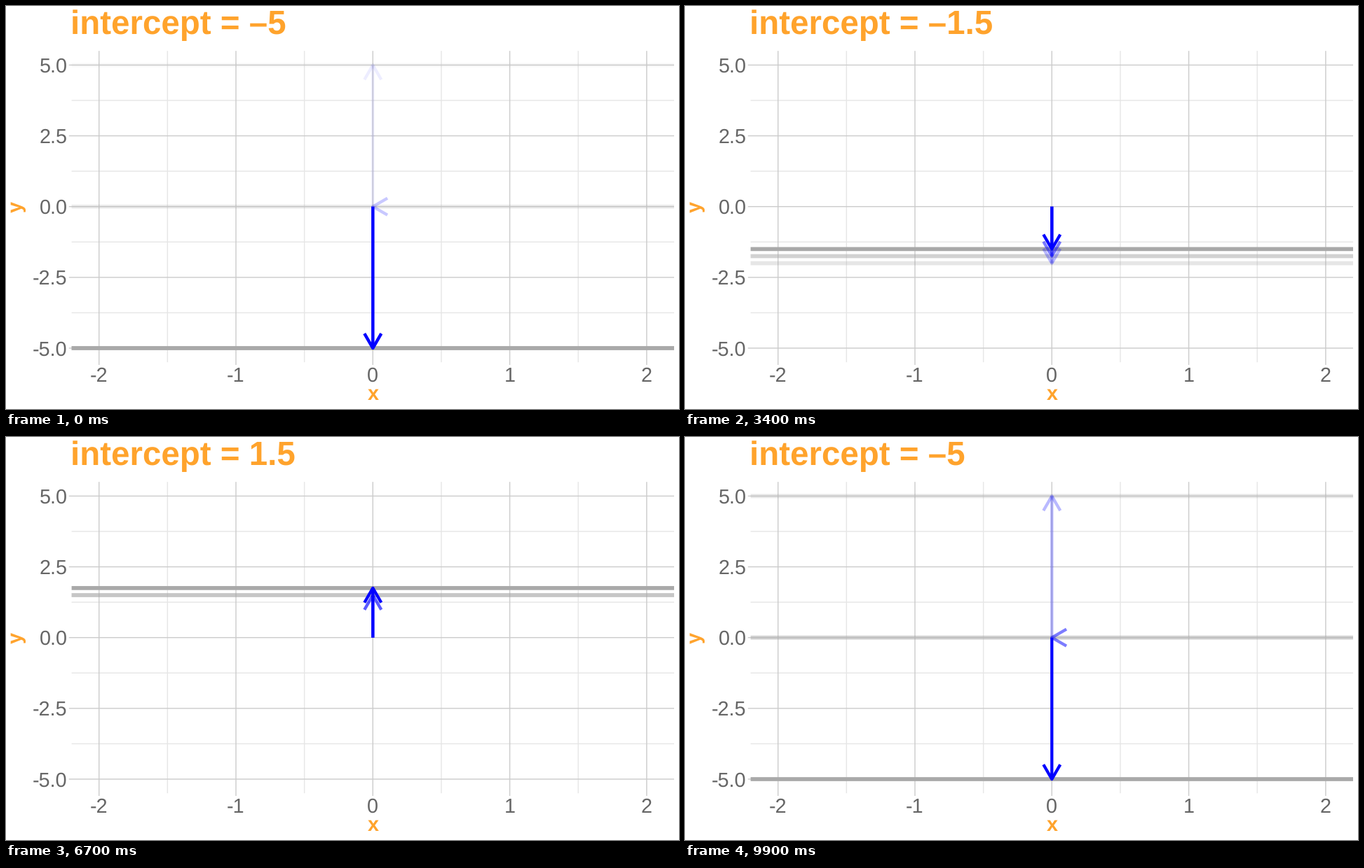
These frames come from a looping animation (960 px wide and 576 px high, 10000 ms). A matplotlib script:

```python
import numpy as np
import matplotlib.pyplot as plt
from matplotlib.animation import FuncAnimation

W, H, DPI = 960, 576, 96
PT = 72 / DPI                      # points per pixel
FRAMES, INTERVAL, WAKE = 100, 100, 5
ORANGE, GREY, BLUE = "#ffa32c", "#a9a9a9", "#0000ff"
LEFT, RIGHT, TOP, BOTTOM = 93.6, 953, 64.2, 509.2
TICK = 3.8

plt.rcParams.update({"path.snap": False, "text.hinting": "none",
                     "font.family": "Liberation Sans"})
fig = plt.figure(figsize=(W / DPI, H / DPI), dpi=DPI, facecolor="white")
ax = fig.add_axes([0, 0, 1, 1])
ax.set(xlim=(0, W), ylim=(H, 0))
ax.axis("off")
ax.autoscale(False)


def px(x):
    return 523.3 + 195.3 * x


def py(y):
    return 286.7 - 40.46 * y


def line(xs, ys, color, width, alpha=1, z=1):
    return ax.plot(xs, ys, color=color, lw=width * PT, alpha=alpha, zorder=z,
                   solid_capstyle="butt", solid_joinstyle="round")[0]


def label(x, y, text, size=28.8, **style):
    return ax.text(x, y, text, size=size * PT, va="baseline", **style)


def grid(xs, ys, color, width, tick=0):
    for x in xs:
        line([px(x)] * 2, [TOP, BOTTOM + tick], color, width)
    for y in ys:
        line([LEFT - tick, RIGHT], [py(y)] * 2, color, width)


def draw_panel():
    xs, ys = np.arange(-2, 3), np.arange(-5, 5.1, 2.5)
    grid(xs[:-1] + 0.5, ys[:-1] + 1.25, "#e6e6e6", 1.4)
    grid(xs, ys, "#cccccc", 1.42, TICK)
    for x in xs:
        label(px(x), 536.7, str(x), color="#666666", ha="center")
    for y in ys:
        label(87.6, py(y) + 10.3, f"{y:.1f}", color="#666666", ha="right")

    name = dict(color=ORANGE, weight="bold", ha="center")
    label(px(0), 563, "x", **name)
    label(23, py(0), "y", rotation=90, rotation_mode="anchor", **name)


def arrow(y, alpha):
    """Arrow from zero to y; a zero-length one points left."""
    tip = np.array([px(0), py(y)])
    back = np.array([0, np.sign(y)]) if y else np.array([1, 0])
    side = back[::-1]
    wings = [tip + 20.8 * back + 12 * s * side for s in (-1, 1)]
    head = np.array([wings[0], tip, wings[1]])
    return [line([px(0)] * 2, [py(0), py(y)], BLUE, 4.27, alpha, 3),
            line(*head.T, BLUE, 4.27, alpha, 3)]


def timeline():
    """(level, title value) per step: hold each state, then one halfway step."""
    steps = []
    for i in range(21):
        v = -5 + i / 2
        following = v + 0.5 if v < 5 else -5
        hold = 3 if i == 8 or i > 16 else 4
        steps += [(v, v)] * hold + [((v + following) / 2, v)]
    return steps[1:] + steps[:1]


def draw(frame):
    while live:
        live.pop().remove()
    for age in reversed(range(WAKE)):
        level = STEPS[(frame - age) % FRAMES][0]
        alpha = (1 - age / WAKE) ** 3
        live.append(line([LEFT, RIGHT], [py(level)] * 2, GREY, 5.69, alpha, 2))
        live.extend(arrow(level, alpha))
    value = f"{STEPS[frame][1]:g}".replace("-", "\u2013")
    title.set_text(f"intercept = {value}")
    return live + [title]


STEPS = timeline()
live = []
draw_panel()
title = label(92, 40, "", 47.5, color=ORANGE, weight="bold", ha="left")
anim = FuncAnimation(fig, draw, frames=FRAMES, interval=INTERVAL,
                     init_func=lambda: [], repeat=True, repeat_delay=0)
plt.show()
```
